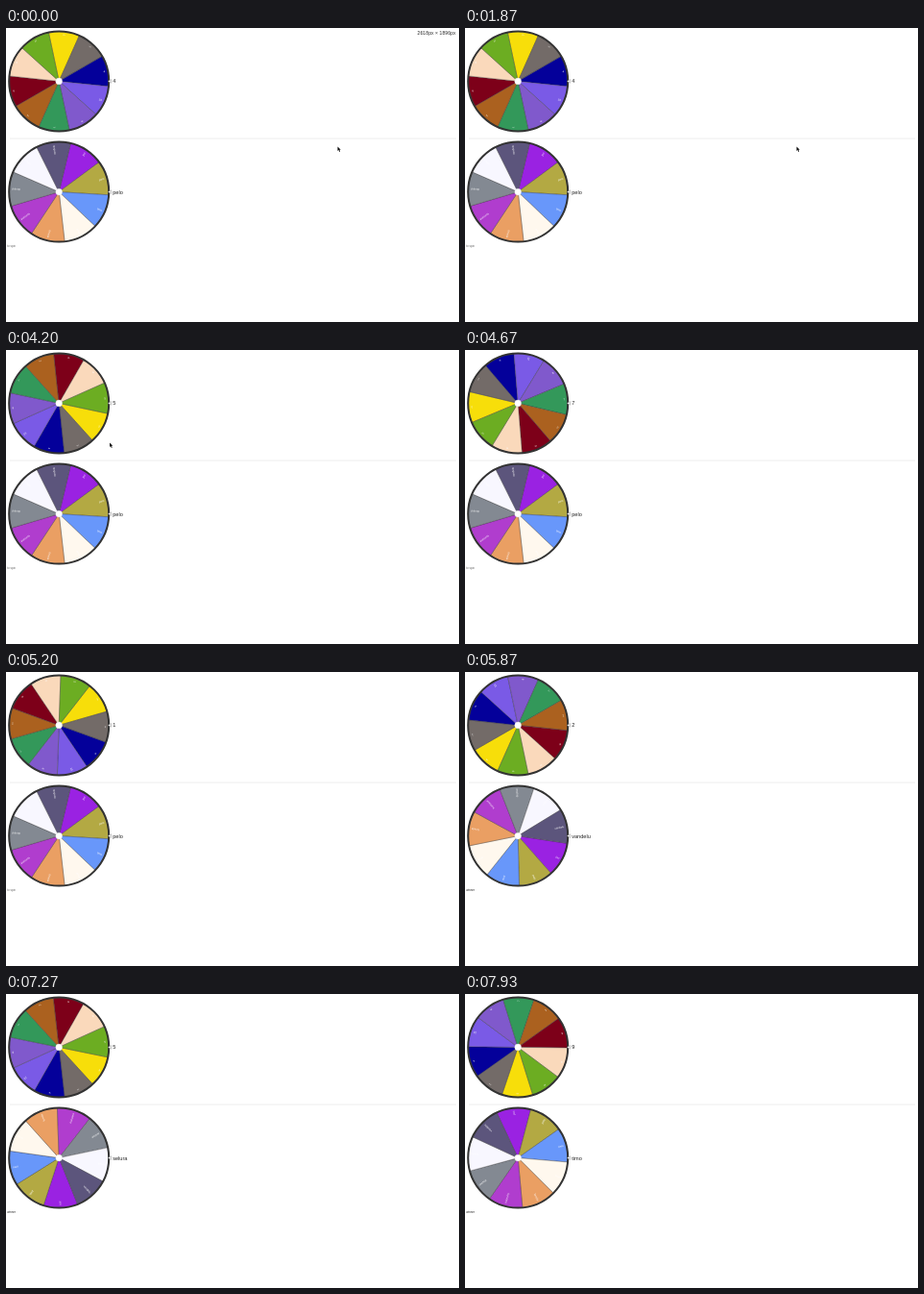
An HTML page with a canvas for the animation above (8 s loop, 472 by 306 pixels).

```html
<!DOCTYPE html>
<html>
<head>
<meta charset="utf-8">
<style>
html, body { margin: 0; width: 100%; height: 100%; overflow: hidden; background: #fff; }
canvas { display: block; width: 472px; height: 306px; }
</style>
</head>
<body>
<canvas id="stage"></canvas>
<script>
const W = 472, H = 306, LOOP = 8000, TICK = 1000 / 15;
const FONT = '"Liberation Sans", Arial, sans-serif';
const canvas = document.getElementById('stage');
const ctx = canvas.getContext('2d');
const ratio = window.devicePixelRatio || 1;
canvas.width = W * ratio;
canvas.height = H * ratio;

// Spin keys: [time, angle in degrees clockwise from the top, degrees per ms]
const numberWheel = {
  x: 55.2, y: 55.4,
  slices: [
    ['#f7de0a', '3'], ['#736b68', '1'], ['#04009a', '4'], ['#7a5ae6', '10'], ['#8059cc', '8'],
    ['#33985a', '7'], ['#ab611f', '2'], ['#7d0019', '9'], ['#fad9bb', '6'], ['#6cad22', '5']
  ],
  spin: [[3850, -12, .34], [4200, 102, .325], [5200, 398, .267], [6530, 702.5, .186],
    [7270, 822, .125], [7930, 882.5, .057], [8000, 886, .05]]
};
const nameWheel = {
  x: 55.2, y: 170.6,
  slices: [
    ['#9a22e2', 'jori'], ['#b3a943', 'pelo'], ['#6897fa', 'timo'], ['#fff8ee', 'orvet'],
    ['#ea9f63', 'fenola'], ['#b03dce', 'kurivane'], ['#838992', 'dostrel'],
    ['#f8f7ff', 'selura'], ['#5c557c', 'vandelu']
  ],
  spin: [[5600, 13.5, .32], [6530, 305, .302], [7270, 519, .277], [7930, 694, .254], [8000, 711.5, .25]]
};
const cursorPath = [[2000, 345.5, 123.5], [2330, 284, 94], [2667, 284, 94], [3133, 141, 51.5],
  [3530, 113, 74], [4200, 108, 96.5], [4400, 107, 100]];

const rad = deg => deg * Math.PI / 180;
const segmentAt = (keys, t) => keys.findIndex((k, i) => i && t <= k[0]);

function spinAngle(keys, t) {
  if (t <= keys[0][0]) return keys[0][1];
  const i = segmentAt(keys, t);
  if (i < 0) return keys[keys.length - 1][1];
  const [t0, a0, v0] = keys[i - 1], [t1, a1, v1] = keys[i];
  const d = t1 - t0, u = (t - t0) / d, w = 1 - u;
  return a0 * w * w * (1 + 2 * u) + a1 * u * u * (3 - 2 * u) + d * u * w * (v0 * w - v1 * u);
}

function text(str, x, y, size, color, align = 'left') {
  ctx.font = `${size}px ${FONT}`;
  ctx.fillStyle = color;
  ctx.textAlign = align;
  ctx.fillText(str, x, y);
}

function disc(r, fill, stroke, width) {
  ctx.beginPath();
  ctx.arc(0, 0, r, 0, Math.PI * 2);
  if (fill) { ctx.fillStyle = fill; ctx.fill(); }
  ctx.strokeStyle = stroke;
  ctx.lineWidth = width;
  ctx.stroke();
}

function drawWheel({ x, y, slices, spin }, t) {
  const angle = spinAngle(spin, t), size = 360 / slices.length;
  ctx.save();
  ctx.translate(x, y);
  slices.forEach(([color, label], i) => {
    const start = rad(angle + i * size - 90);
    ctx.beginPath();
    ctx.moveTo(0, 0);
    ctx.arc(0, 0, 52, start, start + rad(size));
    ctx.closePath();
    ctx.fillStyle = color;
    ctx.fill();
    ctx.strokeStyle = '#333';
    ctx.lineWidth = .35;
    ctx.stroke();
    ctx.save();
    ctx.rotate(start + rad(size / 2));
    text(label, 49, 1, 2.9, '#fff', 'right');
    ctx.restore();
  });
  disc(52, null, '#333', 2);
  disc(3.4, '#fff', '#ddd', .4);

  // Pointer
  ctx.beginPath();
  ctx.moveTo(51, 0);
  ctx.lineTo(54.3, -1.8);
  ctx.lineTo(54.3, 1.8);
  ctx.closePath();
  ctx.fillStyle = '#fff';
  ctx.fill();
  ctx.strokeStyle = '#777';
  ctx.lineWidth = .4;
  ctx.stroke();

  const turned = (((90 - angle) % 360) + 360) % 360;
  text(slices[Math.floor(turned / size)][1], 56, 2, 5.6, '#222');
  ctx.restore();
}

function drawCursor(t) {
  if (t > 4400) return;
  const i = t <= cursorPath[0][0] ? 1 : segmentAt(cursorPath, t);
  const [t0, x0, y0] = cursorPath[i - 1], [t1, x1, y1] = cursorPath[i];
  const u = Math.max(0, (t - t0) / (t1 - t0));
  ctx.save();
  ctx.translate(x0 + (x1 - x0) * u, y0 + (y1 - y0) * u);
  ctx.beginPath();
  [[0, 0], [0, 4.6], [1.1, 3.6], [1.9, 5.4], [2.7, 5], [1.9, 3.3], [3.3, 3.3]]
    .forEach(p => ctx.lineTo(...p));
  ctx.closePath();
  ctx.strokeStyle = '#fff';
  ctx.lineWidth = .8;
  ctx.stroke();
  ctx.fillStyle = '#111';
  ctx.fill();
  ctx.restore();
}

function draw(t) {
  ctx.setTransform(ratio, 0, 0, ratio, 0, 0);
  ctx.fillStyle = '#fff';
  ctx.fillRect(0, 0, W, H);
  ctx.fillStyle = '#ececec';
  ctx.fillRect(4, 114.6, 465, .9);
  drawWheel(numberWheel, t);
  drawWheel(nameWheel, t);
  if (t < 860) text('2618px × 1896px', 428.6, 6.6, 5.2, '#333');
  const spun = t >= nameWheel.spin[0][0];
  text(spun ? 'winner' : 'to spin', 1.2, 228, 3, spun ? '#222' : '#666');
  drawCursor(t);
}

function frame() {
  const t = performance.now() % LOOP;
  draw(Math.floor((t + 4) / TICK) % 120 * TICK);
  requestAnimationFrame(frame);
}
frame();
</script>
</body>
</html>
```
